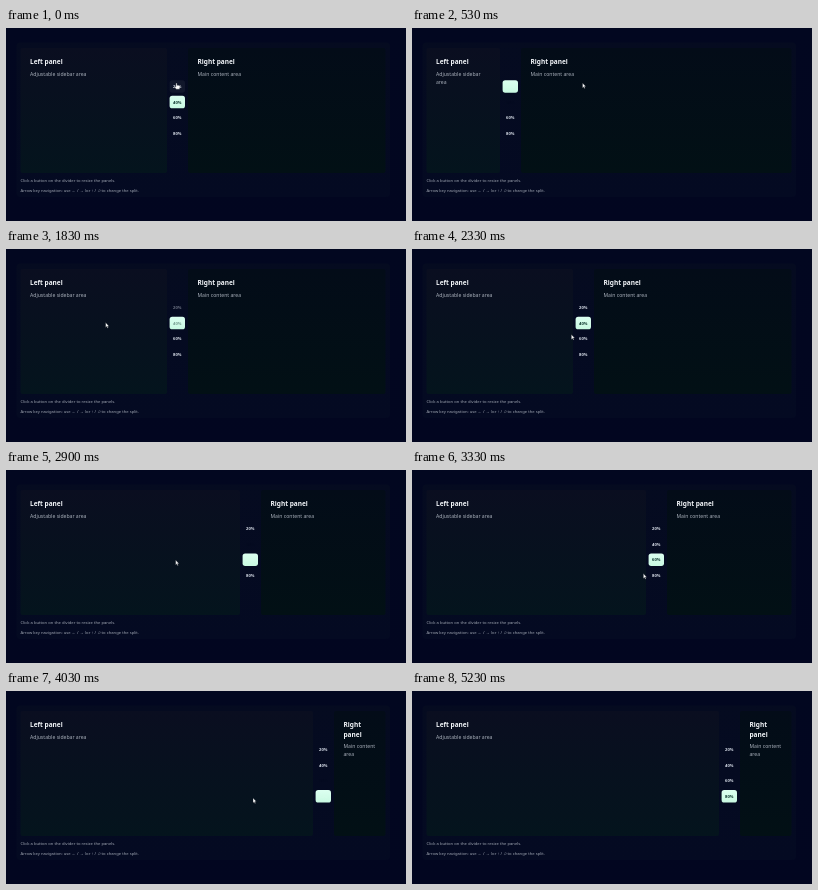
These frames come from a looping animation (400 by 193 pixels, 5930 ms). An HTML page with a canvas:

```html
<!DOCTYPE html>
<html lang="en">
<head>
<meta charset="utf-8">
<title>Split panels</title>
<style>
  html, body { margin: 0; width: 100%; height: 100%; overflow: hidden; background: #020720; }
  canvas { display: block; width: 400px; height: 193px; }
</style>
</head>
<body>
<canvas id="stage"></canvas>
<script>
const LOOP = 5930;
const FONT = '"Noto Sans", "Open Sans", sans-serif';
const LEFT = 14.5, WIDTH = 365, TOP = 20, HEIGHT = 125, DIVIDER = 21, PAD = 9.5;
const BUTTON_W = 15.4, BUTTON_H = 12.5;
const FADE = 200;

// Each click jumps the layout at once; label colours fade a little later.
const clicks = [
  { at: -1000, step: 1, fadeAt: -1000 },
  { at: 470, step: 0, fadeAt: 540 },
  { at: 1670, step: 1, fadeAt: 1735 },
  { at: 2670, step: 2, fadeAt: 2905 },
  { at: 4030, step: 3, fadeAt: 4080 },
];

// Pointer tip: time, x, y
const pointerPath = [
  [0, 170.5, 55], [560, 170.5, 55], [1030, 133, 48], [1130, 121, 67.5],
  [1320, 106, 72.5], [1600, 99.5, 73.5], [1830, 99.5, 73.5], [2230, 156, 84],
  [2640, 169.5, 90], [2900, 169.5, 90], [3440, 247, 107],
  [4669, 247, 107], [4670, 236.5, 90.5], [5169, 236.5, 90.5],
  [5170, 214, 50], [5199, 214, 50], [5200, 190, 9], [5230, 190, 9],
];

const canvas = document.getElementById('stage');
const ctx = canvas.getContext('2d');
const ratio = window.devicePixelRatio || 1;
canvas.width = 400 * ratio;
canvas.height = 193 * ratio;

const clamp = v => Math.max(0, Math.min(1, v));
const buttonY = i => 58.4 + i * 15.65;

function mix(from, to, k) {
  return `rgb(${from.map((c, i) => Math.round(c + (to[i] - c) * k))})`;
}

function gradient(top, bottom, y, h) {
  const g = ctx.createLinearGradient(0, y, 0, y + h);
  g.addColorStop(0, top);
  g.addColorStop(1, bottom);
  return g;
}

function box(x, y, w, h, r, fill) {
  ctx.beginPath();
  ctx.roundRect(x, y, w, h, r);
  ctx.fillStyle = fill;
  ctx.fill();
}

function text(str, x, y, size, color, weight = 400, align = 'left') {
  ctx.font = `${weight} ${size}px ${FONT}`;
  ctx.textAlign = align;
  ctx.fillStyle = color;
  ctx.fillText(str, x, y);
}

// Draws wrapped text and returns the extra height it took.
function paragraph(str, x, y, maxWidth, size, lineHeight, color, weight) {
  ctx.font = `${weight} ${size}px ${FONT}`;
  const lines = [];
  for (const word of str.split(' ')) {
    const joined = lines.length ? `${lines.at(-1)} ${word}` : word;
    if (lines.length && ctx.measureText(joined).width <= maxWidth) lines[lines.length - 1] = joined;
    else lines.push(word);
  }
  lines.forEach((line, i) => text(line, x, y + i * lineHeight, size, color, weight));
  return (lines.length - 1) * lineHeight;
}

function panel(x, w, fill, title, body) {
  box(x, TOP, w, HEIGHT, 2, fill);
  const room = w - 2 * PAD + 0.8;
  const extra = paragraph(title, x + PAD, 36.4, room, 6.5, 9.2, '#f3f6fa', 700);
  paragraph(body, x + PAD, 48.2 + extra, room, 5.1, 7.6, '#a9b0bb', 400);
}

function pointerAt(t) {
  const next = pointerPath.findIndex(p => p[0] > t);
  if (next < 1) return null;
  const [t0, x0, y0] = pointerPath[next - 1], [t1, x1, y1] = pointerPath[next];
  const k = (t - t0) / (t1 - t0);
  return { x: x0 + (x1 - x0) * k, y: y0 + (y1 - y0) * k };
}

function drawPointer({ x, y }, hand) {
  ctx.save();
  ctx.translate(x, y);
  ctx.fillStyle = '#fff';
  ctx.strokeStyle = '#11151f';
  ctx.lineWidth = 0.35;
  const shape = hand
    ? 'M-.6 .5Q0-.4.6.5V2.2L3 2.7Q3.7 2.9 3.6 3.7L3 6.2H-.3L-2 3.9Q-1.8 3-.6 3.8Z'
    : 'M0 0V4.9L1.1 3.9L1.9 5.6L2.7 5.2L1.9 3.6H3.4Z';
  const path = new Path2D(shape);
  ctx.fill(path);
  ctx.stroke(path);
  ctx.restore();
}

function draw(t) {
  const index = clicks.findLastIndex(c => c.at <= t);
  const { step, fadeAt } = clicks[index];
  const previous = index ? clicks[index - 1].step : -1;
  const fade = clamp((t - fadeAt) / FADE);

  ctx.setTransform(ratio, 0, 0, ratio, 0, 0);
  ctx.fillStyle = gradient('#020720', '#020620', 0, 193);
  ctx.fillRect(0, 0, 400, 193);
  box(10.5, 14.5, 373.5, 154.5, 4, gradient('#050b20', '#040a22', 14, 155));

  const leftW = WIDTH * (step + 1) / 5;
  const split = LEFT + leftW;
  const rightX = split + DIVIDER;
  panel(LEFT, leftW + 0.5, gradient('#0a0e20', '#04141d', TOP, HEIGHT), 'Left panel', 'Adjustable sidebar area');
  panel(rightX + 0.5, LEFT + WIDTH - rightX - 0.5, gradient('#030c18', '#021015', TOP, HEIGHT), 'Right panel', 'Main content area');

  text('Click a button on the divider to resize the panels.', 14.5, 154, 4.18, '#a0a7b3');
  text('Arrow key navigation: use ← / → (or ↑ / ↓) to change the split.', 14.5, 164, 4.18, '#a0a7b3');

  const pointer = pointerAt(t);
  const center = split + DIVIDER / 2 + 0.3;
  const light = [222, 228, 238], dark = [6, 48, 40], mint = [213, 252, 234], night = [5, 11, 32];
  let hand = false;

  for (let i = 0; i < 4; i++) {
    const y = buttonY(i);
    const over = pointer && Math.abs(pointer.x - center) < BUTTON_W / 2 && Math.abs(pointer.y - y) < BUTTON_H / 2;
    hand ||= over;
    const x = center - BUTTON_W / 2, top = y - BUTTON_H / 2;
    let color = mix(light, light, 0);
    if (i === step) {
      box(x, top, BUTTON_W, BUTTON_H, 2.6, gradient('#dcfff0', '#c9f9e2', top, BUTTON_H));
      color = mix(mint, dark, fade);
    } else {
      if (over) box(x, top, BUTTON_W, BUTTON_H, 2.6, '#11172b');
      if (i === previous) color = mix(night, light, fade);
    }
    text(`${(i + 1) * 20}%`, center, y + 1.6, 4.1, color, 600, 'center');
  }

  if (pointer) drawPointer(pointer, hand);
}

function tick() {
  draw(performance.now() % LOOP);
  requestAnimationFrame(tick);
}
tick();
</script>
</body>
</html>
```
